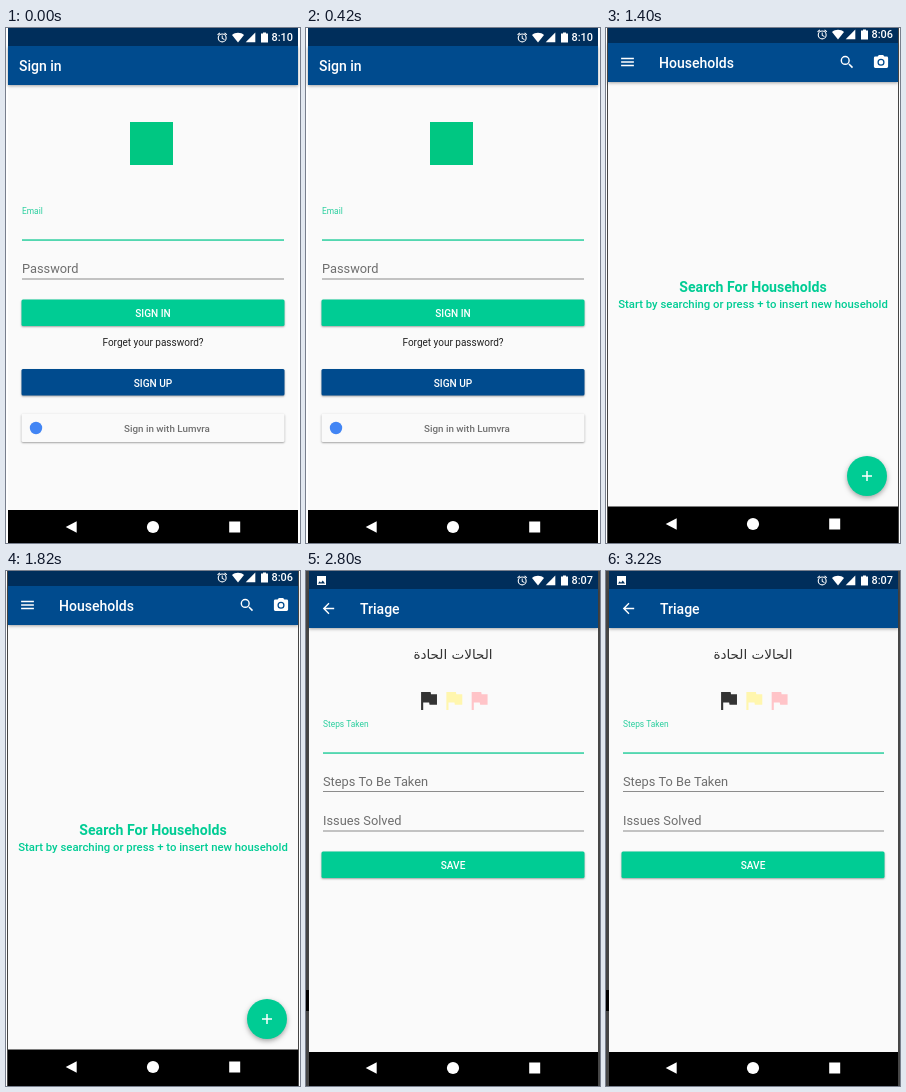
An HTML page with a canvas for the animation above (3500 ms loop, 294 px wide and 515 px high).

```html
<!DOCTYPE html>
<html lang="en">
<head>
<meta charset="utf-8">
<title>Health survey app screens</title>
<style>
html, body { margin: 0; width: 100%; height: 100%; overflow: hidden; background: #fff; }
canvas { display: block; width: 294px; height: 515px; }
</style>
</head>
<body>
<canvas id="stage"></canvas>
<script>
const W = 294, H = 515, HOLD = 700;
const BLUE = '#004b8e', DARK_BLUE = '#002e5b', GREEN = '#00cc94', PAPER = '#fafafa';
const canvas = document.getElementById('stage');
const ctx = canvas.getContext('2d');
const ratio = window.devicePixelRatio || 1;
canvas.width = W * ratio;
canvas.height = H * ratio;

// Icons on a 24-unit grid, filled with the even-odd rule.
const ring = (r, x = 12, y = 12) =>
  `M${x - r} ${y}a${r} ${r} 0 1 0 ${2 * r} 0a${r} ${r} 0 1 0 ${-2 * r} 0z`;
const ICONS = {
  person: ring(2, 12, 4) + 'M21 9h-6v13h-2v-6h-2v6H9V9H3V7h18z',
  home: 'M10 20v-6h4v6h5v-8h3L12 3 2 12h3v8z',
  help: ring(10) + 'M11 17h2v2h-2zM8 9a4 4 0 1 1 7 2.3C14 12.6 13 13 13 15h-2c0-3 3-3.6 3-6a2 2 0 0 0-4 0z',
  reader: ring(3, 12, 5) + 'M12 11.5C9.6 9.3 6.5 8 3 8v11c3.5 0 6.6 1.3 9 3.5 2.4-2.2 5.5-3.5 9-3.5V8c-3.5 0-6.6 1.3-9 3.5z',
  brochure: 'M3 4h18a2 2 0 0 1 2 2v13a2 2 0 0 1-2 2H3a2 2 0 0 1-2-2V6a2 2 0 0 1 2-2zM12 6v13h9V6zM13 9.5h7V11h-7zM13 12h7v1.5h-7zM13 14.5h7V16h-7z',
  info: ring(10) + ring(8) + 'M11 7h2v2h-2zM11 11h2v6h-2z',
  gear: gearPath(),
  menu: 'M3 6h18v2H3zM3 11h18v2H3zM3 16h18v2H3z',
  back: 'M20 11H7.8l5.6-5.6L12 4l-8 8 8 8 1.4-1.4L7.8 13H20z',
  search: ring(6.5, 9.5, 9.5) + ring(4.5, 9.5, 9.5) + 'M14 15.4l5 5 1.5-1.5-5-5z',
  camera: 'M9 2L7.2 4H4a2 2 0 0 0-2 2v12a2 2 0 0 0 2 2h16a2 2 0 0 0 2-2V6a2 2 0 0 0-2-2h-3.2L15 2z' + ring(5) + ring(3.2),
  flag: 'M14.4 6L14 4H5v17h2v-7h5.6l.4 2h7V6z',
  picture: 'M3 3h18v18H3zM5 18h14l-4.5-6-3.5 4.5-2.5-3z',
  alarm: ring(9, 12, 13) + ring(6.8, 12, 13) + 'M11 8h2v5l4 2.5-1 1.5-5-3zM22 6l-4.6-4-1.4 1.6 4.6 4zM2 6l4.6-4L8 3.6l-4.6 4z',
  wifi: 'M12 22L0 7C6 1.5 18 1.5 24 7z',
  signal: 'M2 22h20V2z',
  battery: 'M9 2h6v2h4v18H5V4h4z'
};

function gearPath() {
  const points = [];
  for (let i = 0; i < 32; i++) {
    const r = i % 4 < 2 ? 10 : 7.2;
    const angle = (i - .5) * Math.PI / 16;
    points.push(`${12 + r * Math.cos(angle)} ${12 + r * Math.sin(angle)}`);
  }
  return 'M' + points.join('L') + 'z' + ring(3.5);
}

function rect(x, y, w, h, color) {
  ctx.fillStyle = color;
  ctx.fillRect(x, y, w, h);
}

function disc(x, y, r, color) {
  ctx.fillStyle = color;
  ctx.beginPath();
  ctx.arc(x, y, r, 0, 2 * Math.PI);
  ctx.fill();
}

function text(str, x, y, size, color, { weight = 400, align = 'left', family = 'Roboto, sans-serif' } = {}) {
  ctx.font = `${weight} ${size}px ${family}`;
  ctx.textAlign = align;
  ctx.fillStyle = color;
  ctx.fillText(str, x, y);
}

function arabic(str, x, y, size, align) {
  ctx.direction = 'rtl';
  text(str, x, y, size, '#333', { align, family: '"DejaVu Sans", sans-serif' });
  ctx.direction = 'ltr';
}

function icon(name, x, y, color, scale = .71) {
  ctx.save();
  ctx.translate(x - 12 * scale, y - 12 * scale);
  ctx.scale(scale, scale);
  ctx.fillStyle = color;
  ctx.fill(new Path2D(ICONS[name]), 'evenodd');
  ctx.restore();
}

function withShadow(blur, dy, alpha, draw) {
  ctx.save();
  ctx.shadowColor = `rgba(0,0,0,${alpha})`;
  ctx.shadowBlur = blur * ratio;
  ctx.shadowOffsetY = dy * ratio;
  draw();
  ctx.restore();
}

function statusIcons(clock, y) {
  icon('alarm', 216.2, y, '#fff', .5);
  icon('wifi', 232, y, '#fff', .5);
  icon('signal', 244.5, y, '#fff', .48);
  icon('battery', 258.5, y, '#fff', .5);
  text(clock, 287, y + 4, 10.9, '#fff', { weight: 500, align: 'right' });
}

function navBar(top, y, left, right) {
  rect(left, top, right - left, H - top, '#000');
  ctx.fillStyle = '#fff';
  ctx.beginPath();
  ctx.moveTo(59.7, y);
  ctx.lineTo(70.7, y - 5.8);
  ctx.lineTo(70.7, y + 5.8);
  ctx.fill();
  disc(147, y, 6.1, '#fff');
  rect(223.2, y - 5.5, 11, 11, '#fff');
}

function frame({ left, right, top, clock, title, titleX, nav, navY, edge = '#fff' }) {
  rect(0, 0, W, H, edge);
  rect(left, 0, right - left, H, PAPER);
  withShadow(3, 1, .35, () => rect(left, top, right - left, 39, BLUE));
  rect(left, 0, right - left, top, DARK_BLUE);
  statusIcons(clock, top - 8.6);
  text(title, titleX, top + 25, 14, '#fff', { weight: 500 });
  navBar(nav, navY, left, right);
}

function button(label, y, color, height = 26) {
  withShadow(2, 1, .35, () => {
    ctx.fillStyle = color;
    ctx.beginPath();
    ctx.roundRect(15.5, y - .5, 263, height + .5, 1.5);
    ctx.fill();
  });
  if (label) text(label, 147, y + 17, 10.1, '#fff', { weight: 500, align: 'center' });
}

function fab(x, y, color = GREEN, plus = '#fff') {
  withShadow(5, 2, .35, () => disc(x, y, 20, color));
  rect(x - 5, y - .75, 10, 1.5, plus);
  rect(x - .75, y - 5, 1.5, 10, plus);
}

function activeField(label, x, labelY, lineY) {
  text(label, x, labelY, 8.4, '#2bcf9f');
  rect(x, lineY - .7, 278 - x, 1.5, '#2bcf9f');
}

function field(label, x, labelY, lineY) {
  text(label, x, labelY, 12.8, '#6e6e6e');
  rect(x, lineY - .5, 278 - x, 1, '#8c8c8c');
}

function signInScreen() {
  frame({ left: 2, right: 292, top: 18, clock: '8:10', title: 'Sign in', titleX: 13, nav: 482, navY: 499 });
  rect(124, 94, 43, 43, '#00c782');
  activeField('Email', 16, 186, 212);
  field('Password', 16, 245, 251);
  button('SIGN IN', 272, GREEN);
  text('Forget your password?', 147, 318, 10, '#222', { align: 'center' });
  button('SIGN UP', 341.5, BLUE);
  button('', 386, PAPER, 28);
  disc(30, 400, 6.2, '#4285f4');
  text('Sign in with Lumvra', 161, 404, 9.8, '#707070', { weight: 500, align: 'center' });
}

function drawerScreen() {
  const items = [
    ['person', 'Patient'], ['home', 'Households'], ['help', 'Survey Questions'],
    ['reader', 'VellTome'], ['brochure', 'Brochures'], ['info', 'About'], ['gear', 'Settings']
  ];
  rect(0, 0, W, H, '#fff');
  rect(1, 0, 292, H, '#656565');
  rect(1, 0, 292, 16, '#000f20');
  rect(1, 16, 292, 39, '#002345');
  statusIcons('8:06', 7.4);
  icon('search', 275.5, 36, '#747b83');
  text('Search For Patients', 210, 266, 14.1, '#00583f', { weight: 700, align: 'right' });
  text('Start by searching or press + to insert new patient', 274, 283, 11.33, '#00583f', { weight: 500, align: 'right' });
  fab(262, 452, '#00583f', '#748b83');

  const shade = ctx.createLinearGradient(200, 0, 209, 0);
  shade.addColorStop(0, 'rgba(0,0,0,.4)');
  shade.addColorStop(1, 'rgba(0,0,0,0)');
  rect(200, 16, 9, 467, shade);
  rect(1, 0, 199, 483, PAPER);
  rect(1, 0, 199, 16, '#b2b2b2');
  rect(1, 22, 199, 33, '#ececec');
  items.forEach(([name, label], i) => {
    icon(name, 21, 39 + 34 * i, i ? '#737373' : '#0b4a94');
    text(label, 52, 43 + 34 * i, 10, i ? '#1c1c1c' : '#0b4a94', { weight: 500 });
  });
  navBar(483, 500, 1, 293);
}

function householdsScreen() {
  frame({ left: 2, right: 292, top: 15, clock: '8:06', title: 'Households', titleX: 53, nav: 478.5, navY: 496 });
  rect(1, 0, 1, H, '#444');
  rect(292, 0, 1, H, '#444');
  icon('menu', 21.5, 34, '#fff');
  icon('search', 241, 34.2, '#fff');
  icon('camera', 275, 34.2, '#fff');
  text('Search For Households', 147, 264, 14.1, GREEN, { weight: 700, align: 'center' });
  text('Start by searching or press + to insert new household', 147, 280, 11.33, GREEN, { weight: 500, align: 'center' });
  fab(261, 448);
}

function categoriesScreen() {
  const labels = [
    'التاريخ الصحي', 'قضايا صحية مستمرة', 'تاريخ مجتمع', 'بيئة', 'فحص المريض الجسدي',
    'إنفلونزا', 'تدخين', 'سكري', 'فحص الأمراض الجلدية', 'نظام القلب والأوعية الدموية'
  ];
  frame({ left: 3, right: 292, top: 18, clock: '8:07', title: 'Categories', titleX: 54, nav: 480, navY: 497, edge: '#464646' });
  rect(0, 419, 3, 21, '#000');
  icon('back', 22.5, 37.5, '#fff');
  labels.forEach((label, i) => {
    const y = 57 + 44.1 * i;
    arabic(label, 281, y + 17, 9.8, 'right');
    if (i === labels.length - 1) return;
    rect(14, y + 30.7, 267, 3, '#d4d4d4');
    rect(3, y + 43, 289, 1, '#dcdcdc');
  });
  fab(261, 449.5);
}

function triageScreen() {
  frame({ left: 3, right: 292, top: 18, clock: '8:07', title: 'Triage', titleX: 54, nav: 481, navY: 497, edge: '#464646' });
  rect(0, 419, 3, 21, '#000');
  icon('picture', 15.5, 9.5, '#fff', .5);
  icon('back', 22.5, 37.5, '#fff');
  arabic('الحالات الحادة', 147, 88, 13.5, 'center');
  ['#333', '#fff6ae', '#ffc4c8'].forEach((color, i) => icon('flag', 122.5 + 25.3 * i, 129.5, color, 1.06));
  activeField('Steps Taken', 17, 156, 182);
  field('Steps To Be Taken', 17, 215, 220.5);
  field('Issues Solved', 17, 254, 260);
  button('SAVE', 281, GREEN);
}

const screens = [signInScreen, drawerScreen, householdsScreen, categoriesScreen, triageScreen];

function render(now) {
  const index = Math.floor(now / HOLD) % screens.length;
  ctx.setTransform(ratio, 0, 0, ratio, 0, 0);
  screens[index]();
  requestAnimationFrame(() => render(performance.now() - start));
}

const start = performance.now();
render(0);
</script>
</body>
</html>
```
